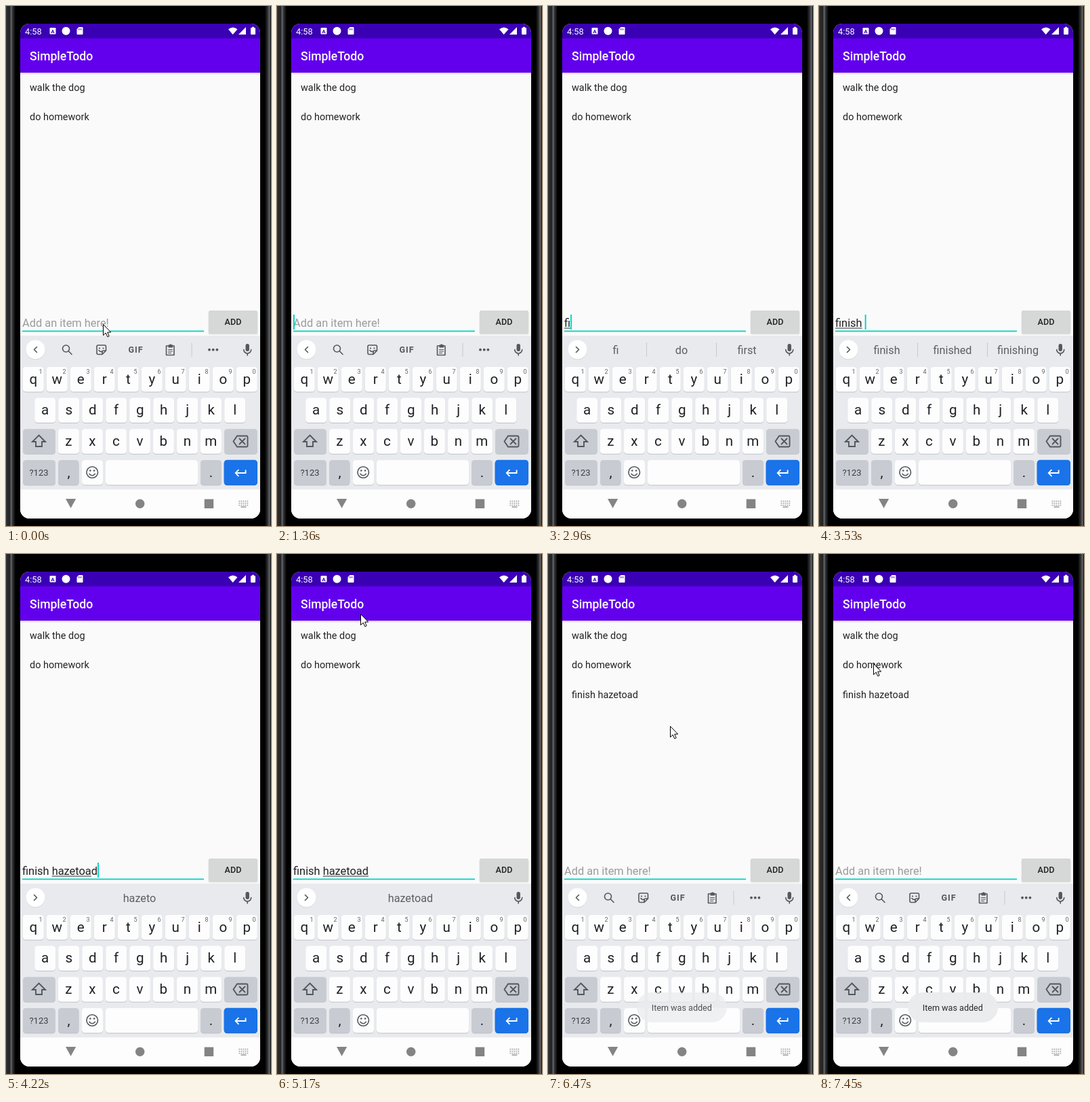
Write an HTML page that moves like this. It is 391x765 px and loops after 8000 ms.

```html
<!DOCTYPE html>
<html lang="en">
<head>
<meta charset="utf-8">
<title>Todo app</title>
<style>
  html, body { margin: 0; width: 100%; height: 100%; overflow: hidden; background: #000; }
  svg { display: block; width: 100%; height: 100%; }
  text { font-family: Roboto, "Open Sans", sans-serif; white-space: pre; }
  .mid { text-anchor: middle; }
  .item { font-size: 14.45px; fill: #222; }
  .field { font-size: 16.4px; fill: #212121; }
  .hint { fill: #9b9b9b; }
  .letter { font-size: 20.6px; fill: #202124; }
  .digit { font-size: 9px; fill: #5f6368; }
  .word { font-size: 16.2px; fill: #5c5f63; }
  .line { fill: none; stroke: #54575b; stroke-width: 1.6; stroke-linejoin: round; stroke-linecap: round; }
  .thin { stroke-width: 1.2; }
  .bold { stroke-width: 1.9; stroke-linejoin: miter; }
  .rule { stroke: #c6c9ce; stroke-width: 1; }
  .ink { fill: #54575b; }
  .nav { fill: #848487; }
</style>
</head>
<body>
<svg viewBox="0 0 391 765" preserveAspectRatio="none">
  <defs>
    <linearGradient id="edge">
      <stop offset="0" stop-color="#38393b"/>
      <stop offset=".15" stop-color="#28292b"/>
      <stop offset=".42" stop-color="#242527"/>
      <stop offset=".54" stop-color="#68696c"/>
      <stop offset=".66" stop-color="#38393b"/>
      <stop offset=".85" stop-color="#1a1a1b"/>
      <stop offset="1" stop-color="#000"/>
    </linearGradient>
    <linearGradient id="shade" x2="0" y2="1">
      <stop offset="0" stop-color="#000" stop-opacity=".2"/>
      <stop offset="1" stop-color="#000" stop-opacity="0"/>
    </linearGradient>
    <clipPath id="screen"><rect x="21" y="26" width="354" height="728" rx="13.500"/></clipPath>
    <clipPath id="button"><rect x="299" y="448" width="72" height="34" rx="2"/></clipPath>
  </defs>

  <rect width="391" height="765"/>
  <rect width="14" height="765" fill="url(#edge)"/>
  <rect width="14" height="765" fill="url(#edge)" transform="matrix(-1 0 0 1 396 0)"/>

  <g clip-path="url(#screen)">
    <rect x="21" y="26" width="354" height="728" fill="#fafafa"/>
    <rect x="21" y="98" width="354" height="3" fill="url(#shade)"/>
    <rect x="21" y="26" width="354" height="22" fill="#3a00b3"/>
    <rect x="21" y="47.500" width="354" height="50.500" fill="#6200ee"/>
    <text x="35" y="79.500" font-size="17.600" font-weight="500" fill="#fff">SimpleTodo</text>

    <g fill="#fff">
      <text x="28" y="41.500" font-size="12.800">4:58</text>
      <rect x="64.500" y="32" width="9" height="9.500" rx="1"/>
      <circle cx="88.500" cy="36.800" r="6"/>
      <path d="M107.500 31H112.500a1 1 0 0 1 1 1V41a1 1 0 0 1-1 1H105.500a1 1 0 0 1-1-1V34z"/>
      <path d="M328 34.200Q334.700 29 341.500 34.200L334.700 42z"/>
      <path d="M343 42H354V31z"/>
      <path d="M361 33q0-1 1-1h1v-1.200h3V32h1q1 0 1 1v8q0 1-1 1h-5q-1 0-1-1z"/>
    </g>
    <text x="69" y="39.800" class="mid" font-size="8" font-weight="700" fill="#3a00b3">A</text>
    <path d="M107 33v2.500M109 33v2.500M111 33v2.500" stroke="#3a00b3" stroke-width=".8"/>

    <text class="item" x="35" y="125.200">walk the dog</text>
    <text class="item" x="35" y="168.400">do homework</text>
    <text class="item" x="35" y="211.600" id="added">finish hazetoad</text>

    <text class="field hint" x="24" y="471.500" id="hint">Add an item here!</text>
    <text class="field" x="24" y="471.500" id="input" xml:space="preserve"></text>
    <rect id="under" y="473.500" height="1" fill="#333"/>
    <rect x="24" y="477.500" width="268" height="1.800" fill="#03d3c3"/>
    <rect id="caret" y="454" width="1.900" height="22" fill="#03d3c3"/>

    <rect x="298.500" y="449" width="73" height="34.500" rx="2.500" fill="#000" opacity=".1"/>
    <rect x="299" y="448" width="72" height="34" rx="2" fill="#d6d7d7"/>
    <g clip-path="url(#button)"><circle id="ripple" cx="333.500" cy="465"/></g>
    <text class="mid" x="335" y="469.300" font-size="12.600" font-weight="500" fill="#222">ADD</text>

    <rect x="21" y="485" width="354" height="226.500" fill="#e8eaed"/>
    <circle cx="43.500" cy="506.300" r="14" fill="#c9ccd1"/>
    <circle cx="43.500" cy="505.500" r="14" fill="#fff"/>
    <path id="chevron" class="line"/>

    <g id="tools">
      <circle class="line" cx="88.500" cy="504" r="5"/>
      <path class="line" d="M92.300 507.800L97 512.500"/>
      <path class="line" d="M136 499h9.500q2 0 2 2v6l-5.500 5.500h-6q-2 0-2-2v-9.500q0-2 2-2zM147.500 507h-3.500q-2 0-2 2v3.500M137 506.500q2 3 5 1.500"/>
      <circle class="ink" cx="138" cy="503.500" r="1.100"/>
      <circle class="ink" cx="143.500" cy="503.500" r="1.100"/>
      <text class="mid ink" x="191.500" y="510" font-size="12.600" font-weight="700" letter-spacing="1">GIF</text>
      <path class="line" d="M236.500 500h11.500v13.500h-11.500z"/>
      <path class="ink" d="M239.500 498.500h1.500a2 2 0 0 1 3.500 0h1.500v4h-6.500z"/>
      <path class="line thin" d="M239.500 505.500h6M239.500 508h6M239.500 510.500h4"/>
      <path class="rule" d="M274 495.500V516"/>
      <circle class="ink" cx="300" cy="505.700" r="1.900"/>
      <circle class="ink" cx="305.700" cy="505.700" r="1.900"/>
      <circle class="ink" cx="311.400" cy="505.700" r="1.900"/>
    </g>
    <g id="words">
      <path id="splits" class="rule" d="M145.500 495V516M248.500 495V516"/>
      <text class="word mid" x="100" y="511.800"></text>
      <text class="word mid" x="197" y="511.800"></text>
      <text class="word mid" x="293.500" y="511.800"></text>
    </g>
    <rect class="ink" x="353.500" y="497" width="5.400" height="11" rx="2.700"/>
    <path class="line" d="M350.700 505.500a5.500 5.500 0 0 0 11 0M356.200 511.200v2.800"/>

    <g id="keys"></g>
    <path class="line bold" d="M48.500 631.500L58 641H53v7H44v-7H39z"/>
    <path class="line bold" d="M341 632.500H355q1.500 0 1.500 1.500v13q0 1.500-1.500 1.500H341L335.500 640.500zM344.500 636.500l8 8M352.500 636.500l-8 8"/>
    <circle class="line" cx="127.200" cy="686" r="8.300"/>
    <circle class="ink" cx="124.300" cy="683.500" r="1.300"/>
    <circle class="ink" cx="130.100" cy="683.500" r="1.300"/>
    <path class="line" d="M122.900 688.300q4.300 5 8.600 0"/>
    <path transform="translate(335.600 676.200) scale(.9)" fill="#fff" d="M19 7v4H5.800l3.600-3.600L8 6l-6 6 6 6 1.400-1.400L5.800 13H21V7z"/>
    <text class="mid" x="48.500" y="691" font-size="13" fill="#3c4043">?123</text>
    <text class="mid letter" x="92.500" y="692.500">,</text>
    <text class="mid letter" x="302.500" y="692.500">.</text>

    <rect x="21" y="711.500" width="354" height="43" fill="#fdfdfd"/>
    <path class="nav" d="M88 725h15.200L95.600 738.800z"/>
    <circle class="nav" cx="197.700" cy="732.200" r="6.700"/>
    <rect class="nav" x="292.700" y="725.500" width="13.500" height="13.500"/>
    <path d="M343.500 728.500h14M343.500 731.500h14M343.500 734.500h14" stroke="#9a9a9d" stroke-width="1.700" stroke-dasharray="1.700 1.300"/>
    <path d="M346.500 737h8" stroke="#9a9a9d" stroke-width="1.500"/>

    <g id="toast">
      <rect x="131" y="645" width="133" height="44" rx="22" fill="#ebecee" opacity=".96"/>
      <text class="mid" x="197.300" y="671.500" font-size="12.600" fill="#2a2a2c">Item was added</text>
    </g>
  </g>
  <path id="mouse" d="M.5.5V16.500L4.200 13 6.800 18.700 9.200 17.600 6.700 12H11.700z" fill="#fff" stroke="#000"/>
</svg>

<script>
const $ = id => document.getElementById(id);
const LOOP = 8000;

function add(tag, attrs, label) {
  const el = document.createElementNS("http://www.w3.org/2000/svg", tag);
  for (const k in attrs) el.setAttribute(k, attrs[k]);
  if (label) el.textContent = label;
  $("keys").append(el);
}

function key(x, y, w, fill = "#fdfdfe", shadow = "#bfc2c8") {
  const box = { x, width: w, height: 36.5, rx: 4.5 };
  add("rect", { ...box, y: y + 1, fill: shadow });
  add("rect", { ...box, y, fill });
}

const GREY = "#c8ccd2";
["qwertyuiop", "asdfghjkl", "zxcvbnm"].forEach((row, r) => {
  const first = [40.3, 57.7, 92.4][r], y = 531 + r * 45.6;
  [...row].forEach((ch, i) => {
    const cx = first + i * 35;
    key(cx - 15.5, y, 31);
    add("text", { x: cx, y: y + 24.6, class: "letter mid" }, ch);
    if (!r) add("text", { x: cx + 10.8, y: y + 10, class: "digit mid" }, String((i + 1) % 10));
  });
});
key(25, 622.2, 48, GREY);
key(322, 622.2, 49, GREY);
key(25, 668, 48, GREY);
key(77, 668, 30.5, GREY);
key(112, 668, 31);
key(147, 668, 136);
key(287, 668, 31, GREY);
key(321.7, 667.7, 49.3, "#1a73e8", "#1967d2");

// Each cue changes part of the state from its time on.
const cues = [
  [0, { mouse: [143, 468], caret: 0, text: "", under: [0, 0], words: null, ripple: [0, 0], toast: 0, added: 0 }],
  [130, { caret: 1 }],
  [560, { caret: 0, mouse: [143, 463] }],
  [960, { mouse: [145, 463] }],
  [1080, { caret: 1, mouse: [142, 463] }],
  [1360, { mouse: null }],
  [1670, { caret: 0 }],
  [2170, { caret: 1 }],
  [2570, { text: "f" }],
  [2690, { under: [0, 1] }],
  [2840, { text: "fi", words: ["fi", "do", "first"] }],
  [2960, { under: [0, 2] }],
  [3110, { text: "fin", under: [0, 3] }],
  [3260, { text: "fini", under: [0, 4] }],
  [3380, { text: "finis", under: [0, 5], words: ["finis", "finish", "finished"] }],
  [3530, { text: "finish ", under: [0, 6], words: ["finish", "finished", "finishing"] }],
  [3650, { text: "finish h", under: [7, 8] }],
  [3770, { text: "finish ha", under: [7, 9], words: ["h", "he", "his"] }],
  [3910, { words: ["ha", "have", "happy"] }],
  [4060, { text: "finish haze", under: [7, 11], words: ["haze", "hazel", "hazed"] }],
  [4220, { text: "finish hazetoad", under: [7, 14], words: ["", "hazeto", ""] }],
  [4370, { under: [7, 15] }],
  [4490, { words: ["", "hazetoad", ""] }],
  [5050, { caret: 0 }],
  [5170, { mouse: [123, 88] }],
  [5300, { mouse: [252, 354] }],
  [5440, { mouse: [331, 440], caret: 1 }],
  [5570, { mouse: [353, 460] }],
  [5690, { mouse: [340, 463] }],
  [5810, { mouse: [334, 463] }],
  [5950, { mouse: [334, 468], caret: 0, ripple: [24.5, 0.07] }],
  [6070, { ripple: [38, 0.06] }],
  [6200, { mouse: [310, 410], text: "", under: [0, 0], words: null, caret: 1, added: 1, ripple: [42, 0.03], toast: 0.15 }],
  [6320, { mouse: [229, 306], ripple: [0, 0], toast: 0.45 }],
  [6470, { mouse: [180, 253], caret: 0, toast: 0.8 }],
  [6620, { mouse: [129, 230], toast: 1 }],
  [6770, { mouse: [87, 158] }],
  [6930, { mouse: [82, 153], caret: 1 }],
  [7050, { mouse: [80, 153] }],
  [7320, { mouse: [80, 157] }],
  [7450, { mouse: [80, 161], caret: 0 }]
];

const stateAt = t => Object.assign({}, ...cues.filter(c => c[0] <= t).map(c => c[1]));
const show = (id, on) => { $(id).style.display = on ? "" : "none"; };
const set = (id, attrs) => { for (const k in attrs) $(id).setAttribute(k, attrs[k]); };
const input = $("input"), labels = $("words").querySelectorAll("text");
const widthTo = n => n ? input.getSubStringLength(0, n) : 0;

function draw(t) {
  const s = stateAt(t);
  input.textContent = s.text;
  show("hint", !s.text);
  show("caret", s.caret);
  set("caret", { x: 24 + widthTo(s.text.length) });
  const [a, b] = s.under.map(widthTo);
  set("under", { x: 24 + a, width: b - a });

  show("tools", !s.words);
  show("words", s.words);
  if (s.words) labels.forEach((el, i) => { el.textContent = s.words[i]; });
  show("splits", s.words && s.words[0]);
  set("chevron", { d: s.words ? "M41.500 501.500l4 4-4 4" : "M45.500 501.500l-4 4 4 4" });

  set("ripple", { r: s.ripple[0], "fill-opacity": s.ripple[1] });
  show("added", s.added);
  set("toast", { opacity: s.toast });
  show("mouse", s.mouse);
  if (s.mouse) set("mouse", { transform: `translate(${s.mouse})` });
}

function tick() {
  draw(performance.now() % LOOP);
  requestAnimationFrame(tick);
}
tick();
</script>
</body>
</html>
```
